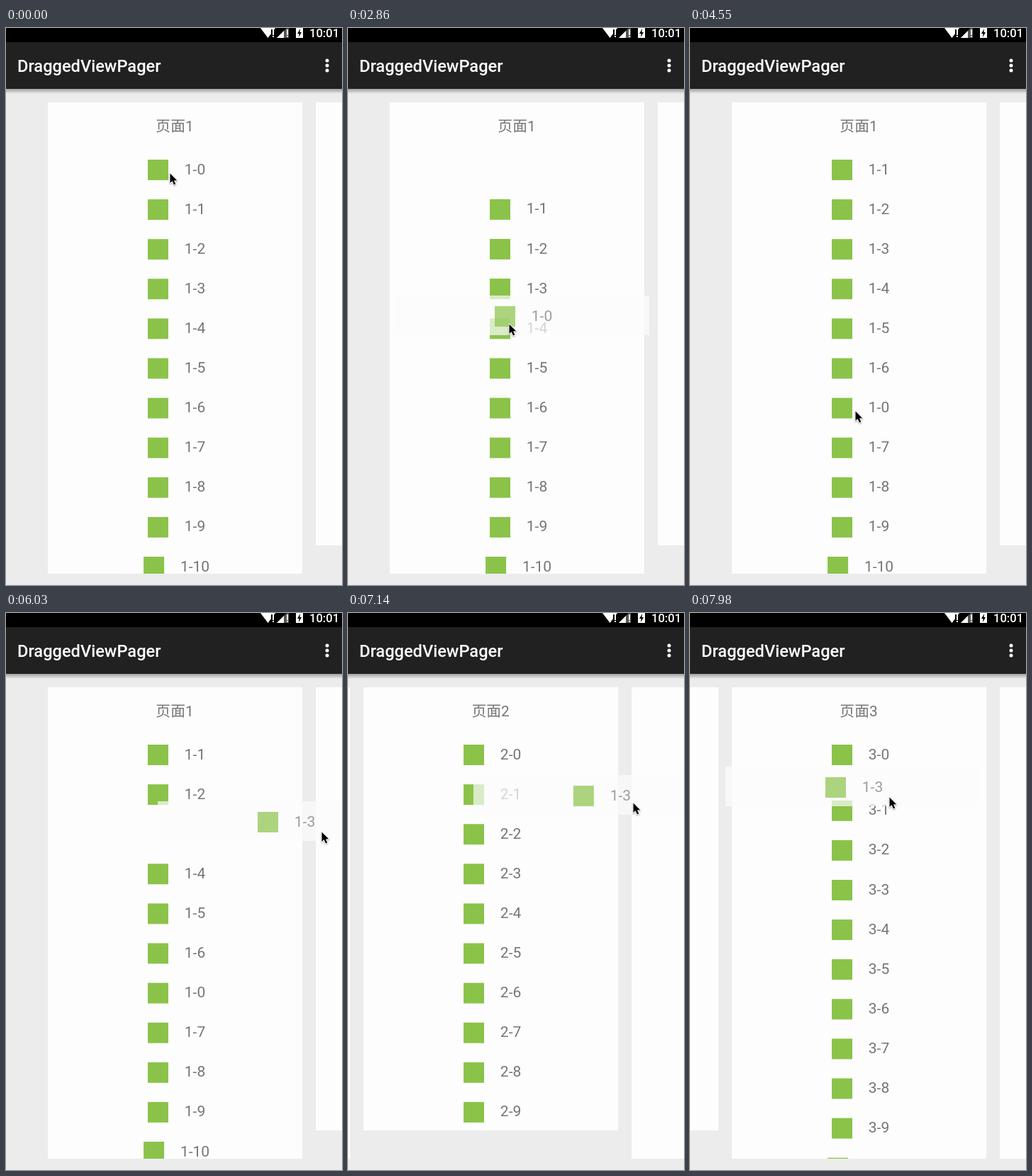
An HTML page with a canvas for the animation above (8000 ms loop, 474x787 px).

```html
<!DOCTYPE html>
<html lang="zh">
<head>
<meta charset="utf-8">
<title>DraggedViewPager</title>
<style>
  html, body { margin: 0; width: 100%; height: 100%; overflow: hidden; background: #ececec; }
  canvas { display: block; width: 474px; height: 787px; }
</style>
</head>
<body>
<canvas id="stage" width="474" height="787"></canvas>
<script>
const ctx = document.getElementById('stage').getContext('2d');
const FONT = 'Roboto, "Noto Sans CJK SC", "Noto Sans CJK JP", "Noto Sans CJK", sans-serif';
const LOOP = 8000, PAGE_W = 359, PAGE_STEP = 378, PAGE_X = 59, PAGE_Y = 105;
const ROW_Y = 171, ROW_H = 56.1, BOX_H = 56, LAG = 60;
const PAPER = '#fdfdfd', GREY = '#757575', GREEN = '#8bc34a';

// Pointer path: [time, x, y]
const PATH = [
  [0, 231, 205], [119, 231, 205], [120, 227, 204], [1570, 227, 204],
  [1730, 227, 240], [1860, 226, 323], [1920, 226, 368], [2040, 227, 404], [2260, 227, 418],
  [3070, 227, 418], [3200, 228, 468], [3260, 228, 495], [3340, 230, 525], [3440, 233, 541],
  [4760, 233, 541], [4960, 298, 320],
  [5640, 298, 320], [5800, 375, 316], [5970, 445, 309],
  [6640, 445, 309], [6970, 408, 272],
  [7080, 408, 272], [7140, 402, 268], [7400, 325, 261], [7630, 281, 260], [LOOP, 281, 260]
];

// Lifted rows; dx, dy lead from the box corner to the pointer
const DRAGS = [
  { label: '1-0', from: 1290, to: 4550, dx: 161, dy: 40 },
  { label: '1-3', from: 5620, to: LOOP, dx: 231, dy: 43 }
];

const ease = (t, start, length) => {
  const p = Math.min(1, Math.max(0, (t - start) / length));
  return (1 - Math.cos(Math.PI * p)) / 2;
};

function pointer(t) {
  const i = Math.max(1, PATH.findIndex(key => key[0] >= t));
  const [t0, x0, y0] = PATH[i - 1], [t1, x1, y1] = PATH[i];
  const p = (t - t0) / (t1 - t0);
  return { x: x0 + (x1 - x0) * p, y: y0 + (y1 - y0) * p };
}

function rect(x, y, w, h, color) {
  ctx.fillStyle = color;
  ctx.fillRect(x, y, w, h);
}

function polygon(color, ...points) {
  ctx.fillStyle = color;
  ctx.beginPath();
  points.forEach(([x, y]) => ctx.lineTo(x, y));
  ctx.closePath();
  ctx.fill();
}

function text(str, x, y, size, color, align = 'center', weight = 400) {
  ctx.font = `${weight} ${size}px ${FONT}`;
  ctx.textAlign = align;
  ctx.fillStyle = color;
  ctx.fillText(str, x, y);
}

function row(label, x, y) {
  const widen = (label.length - 3) * 5.9;
  rect(x + 141 - widen, y + 15, 29, 29, GREEN);
  text(label, x + 207.5, y + 35.5, 21, GREY);
}

// Slot of a row within its page, or null while it is lifted
function slotOf(page, k, t) {
  if (page === 3) return k + (k > 0 ? ease(t, 7880, 230) : 0);
  if (page === 2) return k;
  if (k === 0) return t < 1290 ? 0 : t < 4550 ? null : 6;
  if (k === 3 && t >= 5620) return null;
  if (k <= 3) return k - ease(t, 2850, 300);
  if (k <= 6) return k - ease(t, 4060, 310);
  return k;
}

function drawPage(page, scroll, t) {
  const x = PAGE_X + (page - 1) * PAGE_STEP - scroll;
  if (x > 474 || x + PAGE_W < 0) return;
  const rows = page === 2 ? 10 : 11;
  const height = page === 2 ? 626 : 666;
  rect(x, PAGE_Y, PAGE_W, height, PAPER);
  ctx.save();
  ctx.beginPath();
  ctx.rect(x, PAGE_Y, PAGE_W, height);
  ctx.clip();
  text('页面' + page, x + 179, 146, 20.8, GREY);
  for (let k = 0; k < rows; k++) {
    const slot = slotOf(page, k, t);
    if (slot !== null) row(`${page}-${k}`, x, ROW_Y + slot * ROW_H);
  }
  ctx.restore();
}

function drawDrag(t) {
  const drag = DRAGS.find(d => t >= d.from && t < d.to);
  if (!drag) return;
  const p = pointer(t - LAG), x = p.x - drag.dx, y = Math.round(p.y - drag.dy);
  ctx.globalAlpha = 0.7;
  rect(x, y, PAGE_W, BOX_H, PAPER);
  row(drag.label, x, y);
  ctx.globalAlpha = 1;
}

function drawBars() {
  const shadow = ctx.createLinearGradient(0, 86, 0, 93);
  shadow.addColorStop(0, 'rgba(0,0,0,.32)');
  shadow.addColorStop(1, 'rgba(0,0,0,0)');
  rect(0, 86, 474, 7, shadow);
  rect(0, 0, 474, 20, '#000');
  rect(0, 20, 474, 66, '#212121');
  text('DraggedViewPager', 16, 62, 23.6, '#fff', 'left', 500);
  for (const y of [46, 53, 60]) {
    ctx.beginPath();
    ctx.arc(453, y, 2.5, 0, 7);
    ctx.fill();
  }

  // Wi-Fi, signal, battery, clock
  polygon('#fff', [359, 0], [380, 0], [369.5, 14]);
  rect(374, 2, 5, 12, '#000');
  rect(376, 2, 2, 8, '#fff');
  rect(376, 11, 2, 2, '#fff');
  polygon('#555', [382, 14], [399, 14], [399, 0], [396, 0]);
  polygon('#fff', [382, 14], [392, 14], [392, 4]);
  rect(396, 2, 2, 8, '#fff');
  rect(396, 11, 2, 2, '#fff');
  rect(409, 0, 10, 14, '#fff');
  polygon('#000', [415, 1], [411, 8], [413.5, 8], [413, 13], [417, 6], [414.5, 6]);
  text('10:01', 428, 12.5, 16.6, '#fff', 'left', 500);
}

function drawPointer(t) {
  const { x, y } = pointer(t);
  ctx.save();
  ctx.translate(Math.round(x), Math.round(y));
  ctx.beginPath();
  [[.5, .5], [.5, 14], [3.6, 11.2], [6, 16.6], [8.3, 15.6], [6, 10.4], [10.2, 10.2]]
    .forEach(([px, py]) => ctx.lineTo(px, py));
  ctx.closePath();
  ctx.lineJoin = 'round';
  ctx.lineWidth = 2;
  ctx.strokeStyle = '#fff';
  ctx.shadowColor = 'rgba(0,0,0,.35)';
  ctx.shadowBlur = 2;
  ctx.shadowOffsetY = 1;
  ctx.stroke();
  ctx.shadowColor = 'transparent';
  ctx.fillStyle = '#000';
  ctx.fill();
  ctx.restore();
}

function frame() {
  const t = performance.now() % LOOP;
  const scroll = PAGE_STEP * (ease(t, 6240, 400) + ease(t, 7060, 400));
  rect(0, 0, 474, 787, '#ececec');
  for (let page = 1; page <= 4; page++) drawPage(page, scroll, t);
  drawDrag(t);
  drawBars();
  drawPointer(t);
  requestAnimationFrame(frame);
}
frame();
</script>
</body>
</html>
```
